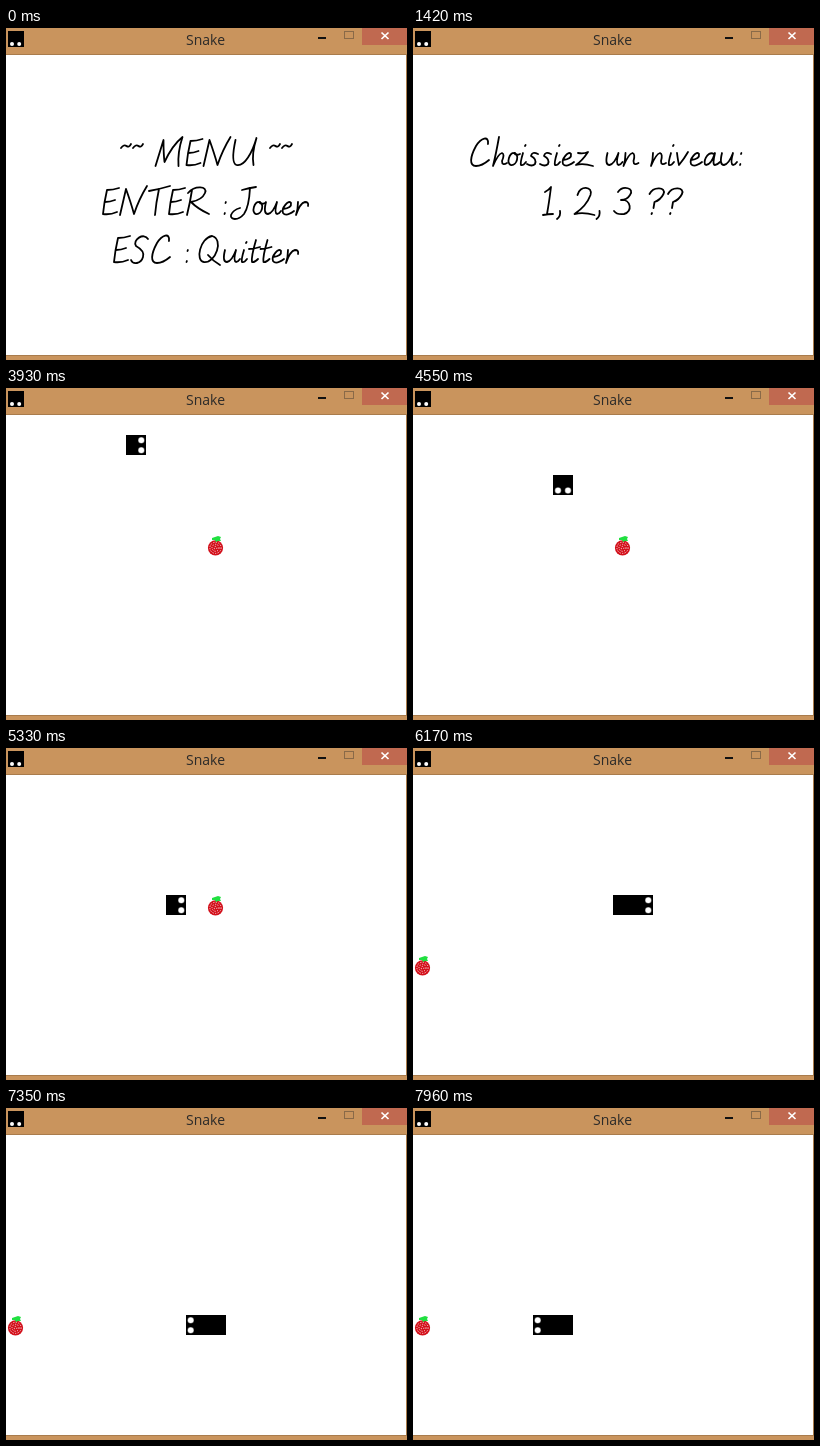
An HTML page with a canvas that plays this animation: 401x332 px, repeating every 8 s.

```html
<!DOCTYPE html>
<html lang="fr">
<head>
<meta charset="utf-8">
<title>Snake</title>
<style>
html, body { margin: 0; width: 100%; height: 100%; overflow: hidden; }
canvas { display: block; }
</style>
</head>
<body>
<canvas id="stage" width="401" height="332" role="img" aria-label="Snake"></canvas>
<script>
const ctx = document.getElementById('stage').getContext('2d');
const LOOP = 8000, CELL = 20, TOP = 27;

// Handwriting: advance width and pen strokes above a baseline at y = 0.
const PEN = {
  ' ': [10.5, ''],
  '~': [12, 'M1-18q3-4 5.5-2t4.5-2'],
  ':': [4, 'M4-12l.4-1M3-1l.4-1'],
  ',': [7, 'M4-4Q5 1 1 4'],
  '?': [18.5, 'M3-21C7-29 20-28 17-21Q14-15 8-13L7-7M5-1l.5-1'],
  1: [14, 'M3-23Q7-25 9-28Q7-12 5-1M1 0Q6-1 11-1'],
  2: [22, 'M4-20C6-30 20-29 17-20Q13-9 1-1Q10-3 21 0'],
  3: [23, 'M5-23C10-30 22-27 17-20Q14-15 8-15C18-16 20-3 11-1Q4 0 1-4'],
  C: [23, 'M19-22C20-31 12-28 7-20C1-9 0 0 7 0Q13 0 20-6'],
  E: [18, 'M18-27Q12-25 6-25Q3-12 2-1Q9 0 16-3M4-13Q9-13 14-15'],
  J: [16, 'M6-25Q13-27 20-28M14-27Q13-8 8-1C2 6-6 5-5 0Q-3-5 4-7'],
  M: [30, 'M1 0L9-26Q9-12 10-4Q18-21 28-29Q23-14 24 0'],
  N: [29, 'M1 0L7-26Q12-12 15-1Q20-16 28-29'],
  Q: [25, 'M14-27C2-25-3-2 6-1C18 0 26-24 14-27M10-8Q15-2 22 2'],
  R: [26, 'M7-25Q5-12 2 0M3-22C10-30 23-29 20-22Q17-15 6-13Q13-6 24-1'],
  S: [20, 'M18-24C14-31 2-23 6-17Q15-12 13-6C11 1 3 2 1-3'],
  T: [19, 'M1-24Q12-26 22-29M11-26Q8-12 7 0'],
  U: [27, 'M4-26Q-1-3 5-1C13 1 21-14 25-28Q20-12 22-1'],
  a: [17, 'M11-12C4-16-1-2 3-1Q8-1 12-13Q9-1 12-1Q14-1 17-4'],
  e: [14, 'M2-6Q11-7 10-12C8-16 0-7 2-2Q5 2 13-4'],
  h: [15, 'M7-29Q4-12 1 0Q6-12 10-13Q13-12 10-5Q10 0 15-3'],
  i: [8, 'M4-13Q1-3 2-1Q4 0 7-4M6-20l.6-1'],
  n: [17, 'M3-13Q3-6 1 0Q6-12 10-13Q13-12 11-5Q11 0 16-3'],
  o: [12, 'M8-13C2-14-1-2 4-1C10 0 13-12 7-13Q9-10 13-12'],
  r: [16, 'M3-13Q3-6 1 0Q5-12 10-13Q14-13 13-9'],
  s: [13, 'M11-12Q5-15 4-10Q10-7 8-2Q5 1 0-2'],
  t: [11.5, 'M8-23Q3-6 4-1Q6 0 10-4M1-14Q6-14 12-16'],
  u: [17, 'M2-13Q-1-1 4-1Q9-2 13-13Q10-2 13-1Q15-1 17-4'],
  v: [14, 'M2-13Q3-5 4-1Q9-7 13-14'],
  z: [20, 'M3-13Q9-12 13-14Q7-5 1-1Q8-3 18 0']
};
for (const c in PEN) PEN[c][1] = new Path2D(PEN[c][1]);

const MENU = [['~~ MENU ~~', 114, 138], ['ENTER : Jouer', 95, 187], ['ESC : Quitter', 106, 235]];
const LEVEL = [['Choissiez un niveau:', 56, 138], ['1, 2, 3 ??', 129, 187]];

// Game: one move per tick, the head starts in column 2, row 1.
const STEP = { R: [1, 0], D: [0, 1], L: [-1, 0] };
const TURNS = 'RRRRRRDDDDDRRRRRDDDLLLLLL';
const TICKS = [3150, 3300, 3530, 3770, 3930, 4170, 4320, 4550, 4780, 4940, 5170, 5330, 5560,
  5720, 5950, 6190, 6340, 6570, 6730, 6960, 7190, 7350, 7580, 7730, 7960];
const EATEN = 13;
const trail = [];
let col = 1, row = 1;
for (const d of TURNS) {
  col += STEP[d][0];
  row += STEP[d][1];
  trail.push([col * CELL, TOP + row * CELL]);
}

function rect(color, x, y, w, h) {
  ctx.fillStyle = color;
  ctx.fillRect(x, y, w, h);
}

function dot(color, x, y, r) {
  ctx.fillStyle = color;
  ctx.beginPath();
  ctx.arc(x, y, r, 0, 7);
  ctx.fill();
}

function write([text, x, y]) {
  ctx.save();
  ctx.translate(x, y);
  ctx.strokeStyle = '#000';
  ctx.lineWidth = 1.8;
  ctx.lineCap = ctx.lineJoin = 'round';
  for (const c of text) {
    ctx.stroke(PEN[c][1]);
    ctx.translate(PEN[c][0], 0);
  }
  ctx.restore();
}

function drawWindow() {
  rect('#c9945d', 0, 0, 401, 332);
  rect('#a97c4c', 0, 26, 401, 302);
  rect('#fff', 0, TOP, 400, 300);
  rect('#000', 2, 3, 16, 16);
  dot('#fff', 6, 16, 2);
  dot('#fff', 13.2, 16, 2);
  ctx.fillStyle = '#2b2a29';
  ctx.font = '14px "Open Sans", "Noto Sans", sans-serif';
  ctx.fillText('Snake', 180, 17);
  rect('#111', 312, 9, 8, 2);
  ctx.lineWidth = 1;
  ctx.strokeStyle = '#8a6a48';
  ctx.strokeRect(338.5, 3.5, 9, 7);
  rect('#c06950', 356, 0, 45, 17);
  ctx.lineWidth = 1.7;
  ctx.strokeStyle = '#fff';
  ctx.stroke(new Path2D('M375.5 4.5l7 6.5m0-6.5l-7 6.5'));
}

function drawFruit(x, y) {
  const cx = x + 9.5, cy = y + 12.8;
  dot('#d20f1a', cx, cy, 7.6);
  ctx.strokeStyle = '#ffe9e9';
  ctx.lineWidth = 0.9;
  ctx.setLineDash([1.2, 1.4]);
  for (const r of [1.4, 3.5, 5.6]) {
    ctx.beginPath();
    ctx.arc(cx, cy, r, 0, 2 * Math.PI);
    ctx.stroke();
  }
  ctx.setLineDash([]);
  ctx.fillStyle = '#20e040';
  ctx.fill(new Path2D(`M${x + 6} ${y + 3}l3-1 3-1 3 1-1 2 1 2-3 0-2 1-1-2-3 0z`));
}

function drawSnake(k) {
  const [x, y] = trail[k];
  if (k >= EATEN) rect('#000', ...trail[k - 1], CELL, CELL);
  rect('#000', x, y, CELL, CELL);
  const [dx, dy] = STEP[TURNS[k]];
  for (const side of [-5, 5]) {
    const ex = x + 10 + dx * 5.3 + dy * side;
    const ey = y + 10.2 + dy * 5.3 + dx * side;
    dot('#777', ex, ey, 3.3);
    dot('#fff', ex, ey, 2.7);
  }
}

function draw(now) {
  const t = now % LOOP;
  drawWindow();
  if (t < 1420) MENU.forEach(write);
  else if (t < TICKS[0]) LEVEL.forEach(write);
  else {
    const k = TICKS.filter(tick => tick <= t).length - 1;
    if (k < EATEN) drawFruit(200, 147);
    else drawFruit(0, 207);
    drawSnake(k);
  }
}

const start = performance.now();
function frame() {
  draw(performance.now() - start);
  requestAnimationFrame(frame);
}
frame();
</script>
</body>
</html>
```
